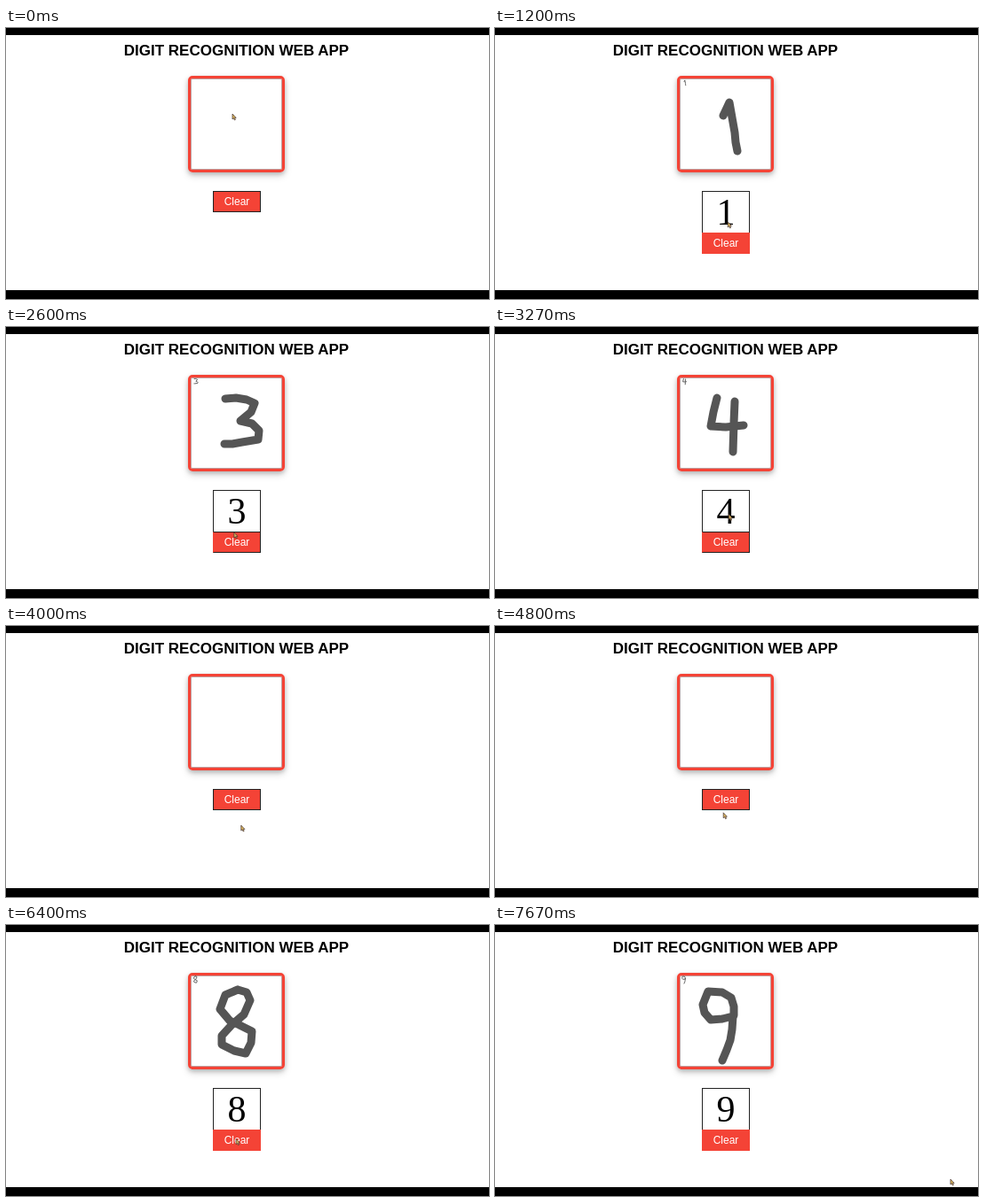
These frames come from a looping animation (544 by 306 pixels, 7790 ms). An HTML page:

```html
<!DOCTYPE html>
<html lang="en">
<head>
<meta charset="utf-8">
<title>Digit recognition</title>
<style>
html, body { margin: 0; width: 100%; height: 100%; overflow: hidden; background: #fff; }
#stage { position: absolute; left: 0; top: 0; width: 544px; height: 306px; overflow: hidden; background: #fff; }
#stage > * { position: absolute; box-sizing: border-box; }
.bar { left: 0; width: 544px; background: #000; }
h1 { left: 0; top: 16px; width: 519px; margin: 0; text-align: center; white-space: nowrap;
  font: bold 17px/20px "Liberation Sans", Arial, sans-serif; color: #000; }
#pad { left: 205px; top: 54px; width: 109px; height: 109px; border: 3px solid #f44336; border-radius: 5px;
  box-shadow: inset 0 0 0 1px rgba(130, 70, 70, .5), 0 2px 5px rgba(0, 0, 0, .2), 0 4px 9px rgba(0, 0, 0, .15); }
#result { left: 233px; top: 184px; width: 54px; height: 48px; border: 1px solid #222; text-align: center;
  font: 42px/46px "Liberation Serif", Times, serif; color: #000; }
#clear { left: 233px; width: 54px; height: 24px; background: #f44336; border: 1px solid #f44336; text-align: center;
  font: 12px/22px "Liberation Sans", Arial, sans-serif; color: #fff; }
svg { left: 0; top: 0; }
#ink { fill: none; stroke: #555; stroke-width: 9; stroke-linecap: round; stroke-linejoin: round; }
</style>
</head>
<body>
<div id="stage">
  <div class="bar" style="top:0;height:8px"></div>
  <div class="bar" style="top:296px;height:10px"></div>
  <h1>DIGIT RECOGNITION WEB APP</h1>
  <div id="pad"></div>
  <div id="result"></div>
  <div id="clear">Clear</div>
  <svg width="544" height="306" viewBox="0 0 544 306">
    <g id="ink"></g>
    <use id="mini" href="#ink" transform="translate(208 56) scale(.104) translate(-208 -56)"/>
    <path id="cursor" d="M0 0V6L1.4 4.8L2.4 7L3.4 6.5L2.5 4.4H4.2Z" fill="#d9b45c" stroke="#433" stroke-width=".7"/>
  </svg>
</div>
<script>
const LOOP = 7790, STEP = 1000 / 15, LAST = 115;
const $ = id => document.getElementById(id);

// Each digit: strokes as [start, end, points], time and place of the Clear click, optional swerve below it
const digits = [
  { strokes: [[130, 400, "257,79 246,88 241,106 246,128 258,138 272,131 278,110 273,89 257,79"]], off: 600, click: [262, 245] },
  { strokes: [[870, 1000, "257,99 264,84 267,101 270,118 271,129 273,139"]], off: 1260, click: [259, 243], dip: [258, 278] },
  { strokes: [[1540, 1790, "244,90 252,80 266,79 274,88 270,103 258,120 245,136 260,134 279,136"]], off: 1990, click: [260, 243] },
  { strokes: [[2140, 2400, "247,81 259,80 271,82 280,86 276,96 264,106 277,109 285,117 284,127 266,130 255,132 246,132"]], off: 2640, click: [259, 252], dip: [260, 278] },
  { strokes: [[2870, 2990, "250,80 246,96 243,112 260,113 280,111"], [3040, 3130, "270,84 269,108 268,141"]], off: 3330, click: [261, 244] },
  { strokes: [[3530, 3800, "276,80 251,81 249,103 266,104 277,114 274,128 262,136 246,135"]], off: 3970, click: [264, 246] },
  { strokes: [[4210, 4530, "270,78 256,90 247,108 246,127 257,140 272,134 274,121 262,115 249,122"]], off: 4750, click: [263, 245] },
  { strokes: [[5000, 5270, "234,74 241,73 250,74 264,78 265,84 262,97 261,110 257,124 252,137 247,142"]], off: 5540, click: [269, 251] },
  { strokes: [[5730, 6200, "261,73 247,79 241,95 252,108 263,113 277,120 276,133 270,145 257,142 243,135 243,125 254,113 268,101 275,85 271,76 261,73"]], off: 6410, click: [259, 250] },
  { strokes: [[6600, 7130, "269,102 269,92 266,82 256,76 240,75 234,90 236,99 243,107 256,106 268,103"],
    [7230, 7400, "268,103 267,118 265,130 261,141 256,153"]], off: LOOP }
];

const strokes = [], keys = [[0, 255, 97]];
digits.forEach((d, digit) => {
  d.on = d.strokes[0][1];
  for (const [t0, t1, points] of d.strokes) {
    const line = document.createElementNS("http://www.w3.org/2000/svg", "polyline");
    line.setAttribute("points", points);
    $("ink").append(line);
    const len = line.getTotalLength();
    strokes.push({ digit, t0, t1, line, len });
    const a = line.getPointAtLength(0), b = line.getPointAtLength(len);
    keys.push([t0, a.x, a.y], [t1, b.x, b.y]);
  }
  if (d.click) keys.push([d.off, ...d.click]);
  if (d.dip) keys.push([d.off + 110, ...d.dip]);
});
keys.push([LAST * STEP, 513, 287]);

function cursorAt(t) {
  const s = strokes.find(s => t >= s.t0 && t <= s.t1);
  if (s) {
    const p = s.line.getPointAtLength(s.len * (t - s.t0) / (s.t1 - s.t0));
    return [p.x, p.y];
  }
  const i = keys.findIndex(k => k[0] > t);
  if (i < 0) return keys[keys.length - 1].slice(1);
  const a = keys[i - 1], b = keys[i], f = (t - a[0]) / (b[0] - a[0]);
  return [1, 2].map(n => a[n] + (b[n] - a[n]) * f);
}

function draw(t) {
  const now = digits.findIndex(d => t < d.off);
  for (const s of strokes) {
    const visible = s.digit === now && t > s.t0;
    s.line.style.display = visible ? "" : "none";
    if (!visible) continue;
    const done = Math.min(1, (t - s.t0) / (s.t1 - s.t0));
    s.line.style.strokeDasharray = done < 1 ? `${s.len * done} ${s.len * 2}` : "none";
  }
  const known = t >= digits[now].on;
  $("result").style.display = $("mini").style.display = known ? "" : "none";
  $("result").textContent = now;
  const button = $("clear").style;
  button.top = known ? "231px" : "184px";
  button.borderColor = !known ? "#222" : now > 1 && now < 8 ? "#222 #222 #222 #f44336" : "#f44336";
  const [x, y] = cursorAt(t);
  $("cursor").setAttribute("transform", `translate(${x} ${y})`);
}

const begin = performance.now();
function tick() {
  const t = (performance.now() - begin) % LOOP;
  draw(Math.min(LAST, Math.floor((t + 3.4) / STEP)) * STEP);
  requestAnimationFrame(tick);
}
tick();
</script>
</body>
</html>
```
